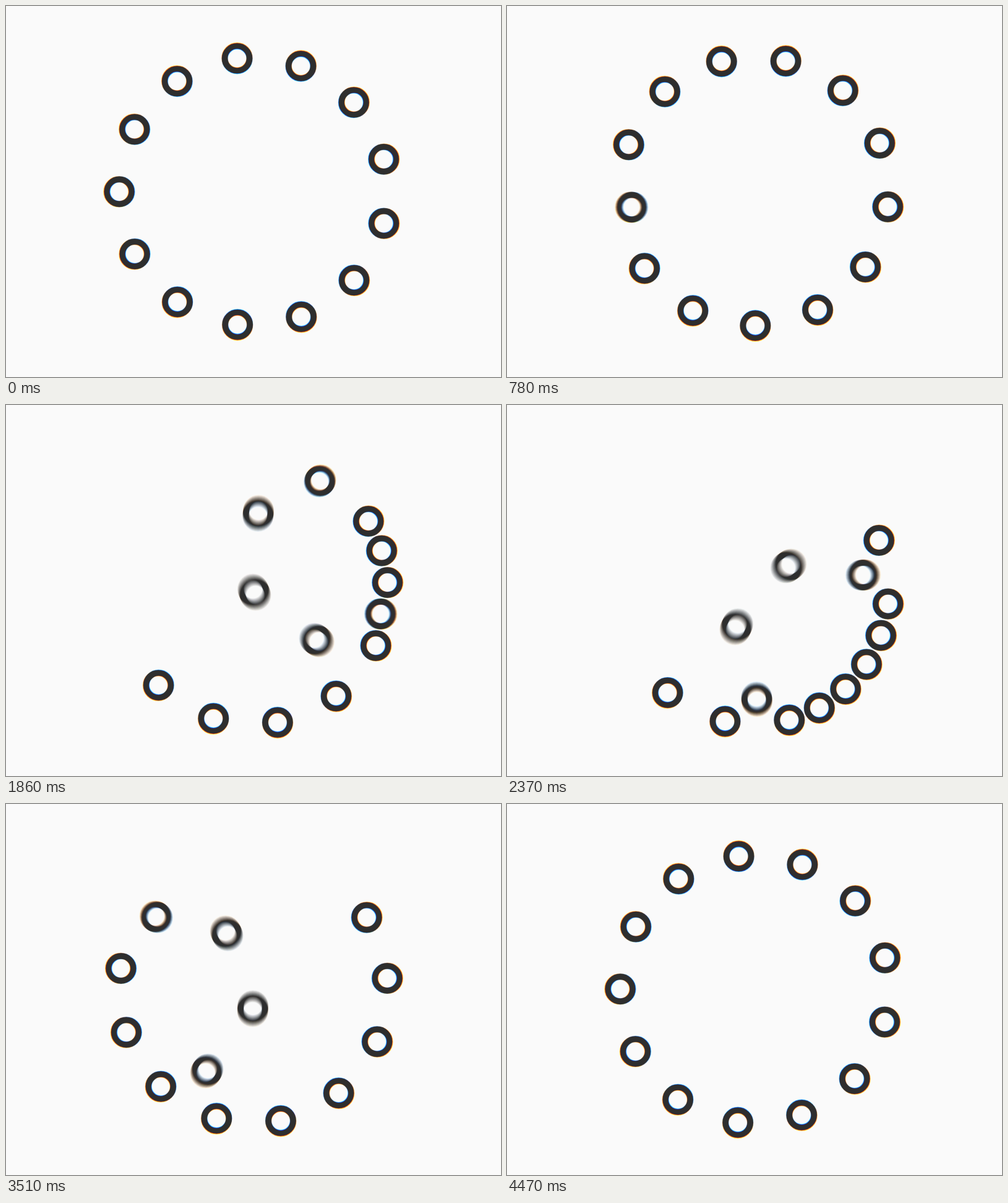
Recreate the animation shown at these times as an HTML page with a canvas. Size 800 px wide and 600 px high, loop 4.5 s.

```html
<!DOCTYPE html>
<html lang="en">
<head>
<meta charset="utf-8">
<title>Crossing rings</title>
<style>
  html, body { margin: 0; width: 100%; height: 100%; overflow: hidden; background: #fafafa; }
  canvas { display: block; }
</style>
</head>
<body>
<canvas id="stage" width="800" height="600"></canvas>
<script>
const ctx = document.getElementById('stage').getContext('2d');

const LOOP = 4500, STEP = 30;
const COUNT = 13, ORBIT = 217, SECTOR = 2 * Math.PI / COUNT;
const SAMPLES = 12, SHUTTER = 0.6 * STEP;

// Each sample darkens one colour channel; 12 x 17 takes 250 down to 46.
const CHANNELS = [
  { color: 'rgb(17,0,0)', scale: 0.997 },
  { color: 'rgb(0,17,0)', scale: 1 },
  { color: 'rgb(0,0,17)', scale: 1.003 }
];

const clamp = (x, lo, hi) => Math.min(hi, Math.max(lo, x));
const smooth = x => x * x * (3 - 2 * x);

// Index of the ring that is passing through the centre.
function crossing(u) {
  const eased = 0.7 * u + 0.3 * smooth(u);
  return 4.865 + 19 * (eased - 0.5);
}

function ringCentres(time) {
  const u = time / LOOP;
  const middle = crossing(u);
  return Array.from({ length: COUNT }, (_, k) => {
    const v = clamp((k - middle) * 0.4155, -1, 1);
    const radius = ORBIT * (1.5 * v - 0.5 * v ** 3);
    const angle = Math.PI + (1.5 * u - k) * SECTOR;
    return [radius * Math.cos(angle), -radius * Math.sin(angle)];
  });
}

function draw(time) {
  ctx.setTransform(1, 0, 0, 1, 0, 0);
  ctx.globalCompositeOperation = 'source-over';
  ctx.fillStyle = '#fafafa';
  ctx.fillRect(0, 0, 800, 600);

  ctx.globalCompositeOperation = 'difference';
  ctx.lineWidth = 10;
  for (let s = 0; s < SAMPLES; s++) {
    const centres = ringCentres(time + SHUTTER * (s + 0.5) / SAMPLES);
    for (const { color, scale } of CHANNELS) {
      ctx.setTransform(scale, 0, 0, scale, 400, 300);
      ctx.strokeStyle = color;
      for (const [x, y] of centres) {
        ctx.beginPath();
        ctx.arc(x, y, 20, 0, 2 * Math.PI);
        ctx.stroke();
      }
    }
  }
}

let shown = -1;
function tick() {
  const step = Math.floor(performance.now() / STEP + 0.01) % (LOOP / STEP);
  if (step !== shown) draw((shown = step) * STEP);
  requestAnimationFrame(tick);
}
tick();
</script>
</body>
</html>
```
